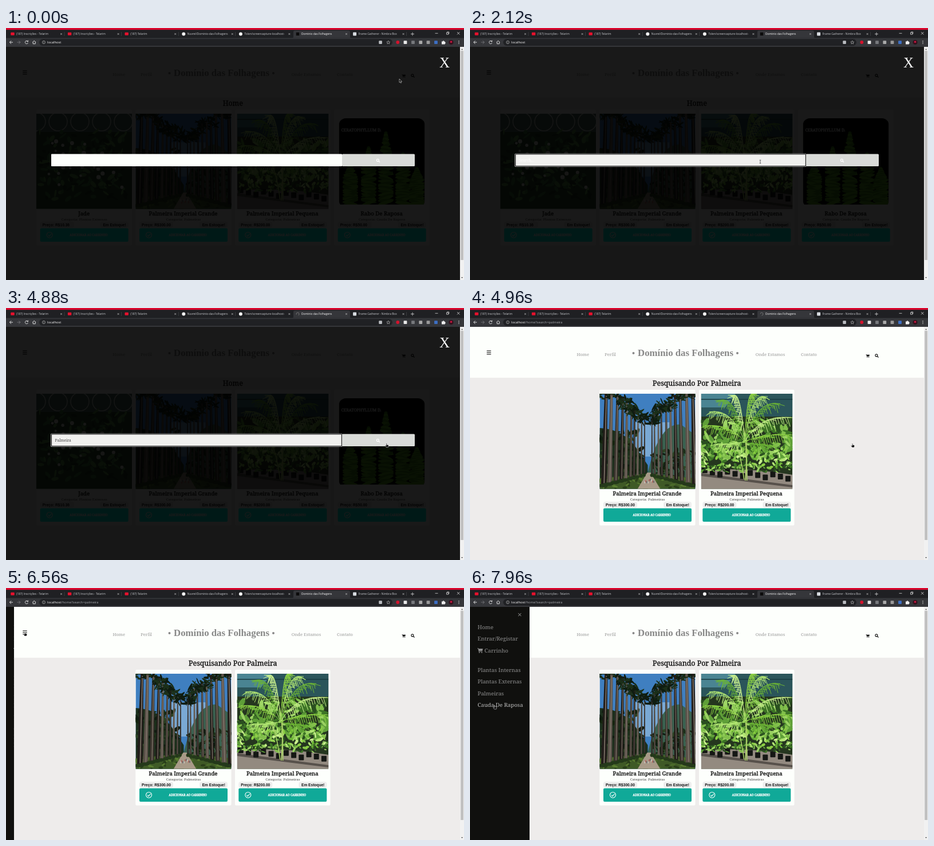
Write an HTML page that moves like this. It is 800 by 441 pixels and loops after 8 s.

```html
<!DOCTYPE html>
<html lang="pt">
<head>
<meta charset="utf-8">
<title>Domínio das Folhagens</title>
<style>
html, body { margin: 0; width: 100%; height: 100%; overflow: hidden; background: #eeeceb; }
svg { display: block; }
#stage, #pointer { position: absolute; left: 0; top: 0; width: 800px; height: 441px; }
text, #side { font-family: "Noto Serif", serif; }
.ui { font-family: "Open Sans", sans-serif; }
.sans { font-family: "Liberation Sans", sans-serif; font-weight: bold; }
.title { font-family: "Liberation Serif", serif; font-weight: bold; }
.thin { font-family: "Liberation Serif", serif; }
.b { stroke: currentColor; stroke-width: .35px; }
#side { position: absolute; left: 0; top: 33px; height: 382.3px; padding-top: 25.7px; width: 0;
  overflow: hidden; background: #10100e; font-size: 9.7px; line-height: 13.9px; }
#side a { display: block; padding: 3.3px 3.3px 3.3px 13.3px; color: #909090; }
#side a.on { color: #bdbdbd; }
#side a svg { display: inline-block; vertical-align: -1px; }
#side i { position: absolute; right: 13.5px; top: 7px; font: 13px/14px "Liberation Sans", sans-serif; color: #818181; }
</style>
</head>
<body>
<svg id="stage" viewBox="0 0 800 441"></svg>
<div id="side"></div>
<svg id="pointer" viewBox="0 0 800 441"></svg>
<script>
const $ = id => document.getElementById(id);
let seed = 11;
const rnd = (a = 0, b = 1) => a + (b - a) * (seed = seed * 16807 % 2147483647) / 2147483647;
const times = (n, f) => Array.from({ length: n }, (_, i) => f(i)).join('');

const rect = (x, y, w, h, fill, r = 0, more = '') =>
  `<rect x="${x}" y="${y}" width="${w}" height="${h}" fill="${fill}" rx="${r}" ${more}/>`;
const disc = (x, y, r, fill) => `<circle cx="${x}" cy="${y}" r="${r}" fill="${fill}"/>`;
const oval = (x, y, a, b, fill, rot = 0) =>
  `<ellipse rx="${a}" ry="${b}" fill="${fill}" transform="translate(${x} ${y}) rotate(${rot})"/>`;
const area = (d, fill) => `<path d="${d}" fill="${fill}"/>`;
const line = (d, color, w = 1) => `<path d="${d}" fill="none" stroke="${color}" stroke-width="${w}"/>`;
const text = (x, y, s, size, fill, cls = '', anchor = 'start') =>
  `<text x="${x}" y="${y}" font-size="${size}" fill="${fill}" color="${fill}" class="${cls}" text-anchor="${anchor}">${s}</text>`;
const mid = (x, y, s, size, fill, cls) => text(x, y, s, size, fill, cls, 'middle');
const lens = (x, y, color) =>
  `<g transform="translate(${x} ${y})"><circle cx="-.6" cy="-.6" r="2" fill="none" stroke="${color}" stroke-width="1.1"/>${line('M.9 .9L3 3', color, 1.3)}</g>`;
const cartShape = color =>
  area('M0 1h1.8l.4 1.2H10L9 6.2H3.2l.2.8H9v1H2.5L1.2 2H0z', color) + disc(3.5, 9.1, .9, color) + disc(8, 9.1, .9, color);
const cross = (x, y, r, color, w) =>
  line(`M${x - r} ${y - r}l${2 * r} ${2 * r}m0 ${-2 * r}l${-2 * r} ${2 * r}`, color, w);

// Pictures, each in its own clipped box
const frame = (x, y, w, h, body) => `<svg x="${x}" y="${y}" width="${w}" height="${h}">${body}</svg>`;
const leaves = (n, x0, x1, y0, y1, size, colors) => times(n, i =>
  oval(rnd(x0, x1), rnd(y0, y1), rnd(.5, 1.2) * size, rnd(.2, .5) * size, colors[i % colors.length], rnd(0, 180)));

function avenue() {
  const dark = ['#0f1c10', '#1b2f19', '#2c4423', '#15240f'];
  let s = rect(0, 0, 167, 167, '#3f7fc0') + rect(62, 50, 60, 60, '#7aa9d4') +
    area('M76 167L92 108Q112 50 142 54L167 72V167z', '#3a6250') +
    area('M0 167V60Q40 62 62 92L84 125V167z', '#1c2f1c') +
    leaves(70, 0, 72, 62, 140, 7, dark) + leaves(90, 92, 167, 98, 146, 6, dark) +
    area('M0 167V148L80 140H92L167 148V167z', '#3f5a26') +
    leaves(60, 0, 167, 146, 165, 5, ['#2a3f1a', '#587a30', '#4a6a2a']) +
    area('M83 138H89L106 167H66z', '#a89a88');
  for (let i = 9; i >= 0; i--) for (const side of [-1, 1]) {
    const d = 7 + i * 4.6 + i * i * .38 + rnd(-1, 1), x = 84 + side * d, w = 1.5 + d * .07;
    const top = Math.max(-4, 44 - d * .8 + rnd(-6, 6)), base = 141 + d * .25, lean = -side * d * .05;
    s += times(14, () => oval(x + rnd(-9, 9), top + rnd(-5, 12), rnd(3, 9), rnd(.7, 2), dark[i % 2], rnd(-75, 75)));
    s += area(`M${x + lean} ${top}h${w * .7}L${x + w} ${base}h${-w * 1.4}z`, ['#221d1a', '#3b342e', '#5a5149'][i % 3]);
    s += line(`M${x + lean + w * .4} ${top + 8}L${x + w * .4} ${base - 4}`, '#857a6e', w * .22);
    s += oval(x, base, w * 1.4, 3, '#24391a');
  }
  return s + times(9, i => rect(78 + i * 2, 148 + rnd(0, 6), 1, 3.5, ['#ddd', '#a33', '#345'][i % 3]));
}

function frond(x, y, dx, dy, color) {
  const cx = x + dx * .35, cy = y + dy * 1.15, side = Math.sign(dx);
  let d = `M${x} ${y}Q${cx} ${cy} ${x + dx} ${y + dy}`;
  for (let u = .2; u <= 1; u += .045) {
    const v = 1 - u, px = v * v * x + 2 * u * v * cx + u * u * (x + dx), py = v * v * y + 2 * u * v * cy + u * u * (y + dy);
    d += `M${px} ${py}l${side * rnd(3, 7)} ${rnd(12, 22) - u * 5}M${px} ${py}l${side * rnd(8, 13)} ${rnd(-7, 0) + u * 7}`;
  }
  return line(d, color, 1);
}

function nursery() {
  const greens = ['#3d7426', '#5f9f38', '#82bf4c', '#2a4f20', '#9ad162'];
  const bright = ['#8cd043', '#b2e673', '#6cb535', '#c9f08d'];
  return rect(0, 0, 160, 167, '#25361f') + rect(0, 0, 160, 40, '#2b555a') + area('M0 0H60L42 24H0z', '#4a8492') +
    rect(0, 9, 160, 1.5, '#183b40') + area('M0 134Q80 128 160 142V167H0z', '#938a80') +
    area('M0 139L160 160V164L0 144z', '#57514b') +
    leaves(170, 0, 160, 48, 115, 9, greens) + leaves(170, 0, 160, 95, 130, 5, greens.concat(bright)) +
    times(12, i => rect(2 + i * 13.2, 129 + i % 3 * 3 + i * .8, 9, 10, '#151714', 1)) +
    leaves(60, 0, 160, 124, 137, 4, greens) +
    line('M77 152Q82 100 74 60M80 152L79 75M75 150Q70 110 60 85', '#a9cf68', 1.6) +
    [[-70, -28], [-62, -52], [-44, -72], [-20, -80], [14, -82], [36, -78], [60, -66], [78, -42], [80, -12], [-52, 4], [48, 6]]
      .map(([x, y], i) => frond(76, 84, x, y, bright[i % 4])).join('');
}

const bush = () => rect(0, 0, 167, 167, '#2c4a2c') + rect(0, 0, 167, 32, '#4c6258') +
  times(5, i => `<circle cx="${i * 38}" cy="14" r="16" fill="none" stroke="#c8d2cd" stroke-width="1.6"/>`) +
  leaves(170, 5, 160, 30, 150, 7, ['#1a381c', '#3f7a3c', '#5c964c']) +
  times(26, () => disc(rnd(20, 150), rnd(40, 130), rnd(2, 4), '#dfe3d8'));

const plumes = () => rect(0, 0, 150, 151, '#000') +
  [[20, 80], [52, 52], [82, 26], [112, 62], [136, 88]].map(([x, top]) => times(34, i => {
    const y = top + i * (151 - top) / 34;
    return oval(x, y, 3 + Math.min(i, 12) * .9, 3, i % 2 ? '#5fae1e' : '#3f8a18', rnd(-25, 25));
  })).join('') + text(4, 23, 'CERATOPHYLLUM D.', 7, '#fff', 'b');

// Page
const buttonText = 'ADICIONAR AO CARRINHO';
function card(x, w, cx, photo, name, kind, price, teal) {
  return rect(x, 143, w, 237.5, '#fdfffc', 2) + photo +
    mid(cx - .5, 327.5, name, 9.65, '#111', 'b') + mid(cx, 337, 'Categoria: ' + kind, 6.15, '#444') +
    rect(cx - 77, 339, 59, 10.5, '#eee', 4) + text(cx - 73, 347, 'Preço: R$' + price, 6.6, '#111', 'sans') +
    rect(cx + 28, 339, 49, 10.5, '#eee', 4) + text(cx + 73, 347, 'Em Estoque!', 6.6, '#111', 'sans', 'end') +
    rect(cx - 77, 350.5, 154, 23.5, teal, 2) + mid(cx + 7.7, 364.4, buttonText, 5.15, '#fff', 'b') +
    `<g class="check"><circle cx="${cx - 60.5}" cy="362.2" r="5" fill="none" stroke="#fff" stroke-width="1.1"/>` +
    line(`M${cx - 63} 362.4l1.9 2 3.6-4`, '#fff', 1.1) + '</g>';
}
const palms = teal =>
  card(226.3, 167.2, 310, frame(226.5, 150, 167, 166.5, avenue()), 'Palmeira Imperial Grande', 'Palmeiras', '300.00', teal) +
  card(400, 166.5, 483.3, frame(403.7, 150, 159.5, 166.5, nursery()), 'Palmeira Imperial Pequena', 'Palmeiras', '200.00', teal);

const header = rect(0, 33, 793, 408, '#eeeceb') + rect(0, 33, 793, 89, '#fdfffc') +
  times(3, i => rect(29.3, 74.4 + i * 3, 7.4, 1.1, '#111')) +
  [['Home', 197.3], ['Perfil', 245], ['Onde Estamos', 524.5], ['Contato', 592]].map(([s, x]) => mid(x, 84, s, 7.6, '#999')).join('') +
  mid(376.5, 84, 'Domínio das Folhagens', 16.8, '#888', 'title') + disc(285.5, 79, 2, '#888') + disc(467, 79, 2, '#888') +
  `<g transform="translate(691.5 80.3) scale(.65)">${cartShape('#111')}</g>` + lens(710.5, 83.5, '#111');

const neon = '#00ffee';
const home = mid(396.3, 136, 'Home', 12.4, '#111', 'b') +
  card(53, 167, 136.7, frame(53, 150, 167, 166.5, bush()), 'Jade', 'Plantas Externas', '10.36', neon) + palms(neon) +
  card(573, 167, 656.7, `<g clip-path="inset(0 round 12px)">${frame(581.5, 158, 150, 151, plumes())}</g>`,
    'Rabo De Raposa', 'Cauda De Raposa', '50.00', neon) +
  rect(0, 33, 793, 408, '#000', 0, 'opacity=".9"');

const modal = mid(766, 68.5, 'X', 25, '#fff', 'thin') +
  `<g id="idle">${rect(79, 220.5, 508, 21.5, '#fdfffc', 1)}</g>` +
  `<g id="focus">${rect(78.2, 219.7, 509.3, 23.1, '#fff', 1.5) + rect(78.8, 220.3, 508.1, 21.9, '#111', 1) + rect(80, 221.4, 505.8, 19.7, '#f0f0ee')}</g>` +
  rect(587, 220.5, 127, 21.5, '#d9dbd8', 1.5) + lens(650, 232, '#fff') +
  text(85.5, 234, '', 6.6, '#444').replace('<text', '<text id="field"') +
  rect(85.5, 227, .7, 9, '#222', 0, 'id="caret"');

// Browser window
const tabs = ['(187) Inscrições - Telarim', '(187) Inscrições - Telarim', '(187) Telarim',
  'Nuvrel/Dominio-das-Folhagens', 'Tolen/screencapture-localhost-', 'Dominio das Folhagens', 'Frame Gatherer - Nimbra Box'];
const chrome = rect(0, 0, 800, 33, '#35363a') + rect(0, 0, 800, 17.5, '#1f2023') + rect(0, 0, 800, 3.2, '#d9082f') +
  area('M500 17.5Q502 17.5 502 15V7Q502 4.5 504.5 4.5H598.5Q601 4.5 601 7V15Q601 17.5 603 17.5z', '#35363a') +
  tabs.map((s, i) => {
    const x = 11.5 + i * 99.6;
    return text(x + 6.5, 12.2, s, 4.9, i == 5 ? '#fff' : '#c9cbcf', 'ui') + cross(x + 85, 10.5, 1.5, '#ddd', .6) +
      (i < 3 ? rect(x - 3.2, 7.8, 6.4, 5, '#e8112d', 1) : i < 5 ? disc(x, 10.4, 3, '#f2f2f2') : i == 6 ? rect(x - 3, 7.5, 6, 6, '#d9dde2', 1) : '') +
      (i == 4 || i == 5 ? '' : rect(x + 90.2, 7, .5, 7, '#55575b'));
  }).join('') +
  `<g id="icon">${rect(506.8, 7.7, 5.5, 5.5, '#0b0b0b')}</g><circle id="spin" cx="509.5" cy="10.5" r="2.4" fill="none" stroke="#777" stroke-width=".9" stroke-dasharray="10 5"/>` +
  line('M707 10.5h6m-3-3v6M749.5 9.3h5M788 7l4.5 4.5m0-4.5l-4.5 4.5M769.5 8h3.2v3.2h-3.2zM770.6 8V6.9h3.2v3.2h-1', '#eee', .7) +
  line('M12 25H6.5m2.6-2.7L6.4 25l2.7 2.7', '#eee', .9) + line('M19.5 25H25m-2.6-2.7l2.7 2.7-2.7 2.7', '#77787c', .9) +
  line('M38 23.4A2.6 2.6 0 1 0 38.4 26M38.5 21.8v2h-2', '#eee', .9) + line('M46.3 25l2.9-2.7 2.9 2.7M47.2 24.5v3.2h4v-3.2', '#eee', .9) +
  rect(58, 19.2, 617, 11.8, '#202124', 5.9) +
  `<circle cx="66" cy="25" r="2.6" fill="none" stroke="#ccc" stroke-width=".6"/>` + rect(65.7, 24.5, .6, 2, '#ccc') + rect(65.7, 23.4, .6, .6, '#ccc') +
  `<text x="72" y="27.2" font-size="5.8" fill="#fff" class="ui">localhost<tspan id="path" fill="#a4a7ab"></tspan></text>` +
  rect(651.3, 22.3, 5.6, 5.6, '#b9bcc0', 1) +
  line('M667.8 22.2l.9 2 2.1.2-1.6 1.4.5 2.1-1.9-1.1-1.9 1.1.5-2.1-1.6-1.4 2.1-.2z', '#ccc', .6) +
  disc(684.3, 25, 2.9, '#d5122c') +
  [[697.5, '#e8e8e8'], [711, '#77797d'], [724.3, '#aaa'], [737.5, '#999'], [751, '#3d6fc4']]
    .map(([x, c]) => rect(x - 2.9, 22.2, 5.8, 5.8, c, .8)).join('') +
  area('M761 23.4h2a1.1 1.1 0 0 1 2.2 0h1.6v1.6a1.1 1.1 0 0 1 0 2.2v1.3h-5.8z', '#eee') +
  disc(777.5, 25, 4, '#35101c') + disc(777.5, 24.2, 1.8, '#c5163f') + times(3, i => disc(791, 22.8 + i * 2.2, .7, '#ddd')) +
  rect(793, 33, 7, 408, '#f1f1f1') + rect(794.2, 40, 4.8, 366, '#c0c0c0') +
  area('M795 38.3l1.6-2 1.6 2z', '#555') + area('M795 436l1.6 2 1.6-2z', '#555');

$('stage').innerHTML = header + `<g id="home">${home + modal}</g>` +
  `<g id="found">${mid(396.3, 136, 'Pesquisando Por Palmeira', 12.4, '#111', 'b') + palms('#10a998')}</g>` + chrome;
$('side').innerHTML = '<i>×</i>' + ['Home', '<span style="white-space:nowrap">Entrar/Registar</span>',
  `<svg width="9.5" height="10" viewBox="0 0 10 10">${cartShape('#909090')}</svg> Carrinho`, '',
  'Plantas Internas', 'Plantas Externas', 'Palmeiras', 'Cauda De Raposa']
  .map(s => s ? `<a>${s}</a>` : '<div style="height:13.4px"></div>').join('');

const shape = d => `<path d="${d}" fill="#0a0a0a" stroke="#fff" stroke-width=".5"/>`;
$('pointer').innerHTML =
  `<g id="arrow">${shape('M0 0V6.4L1.5 5.1 2.5 7.3 3.5 6.8 2.6 4.7H4.6z')}</g>` +
  `<g id="hand">${shape('M-.6 .3Q0-.5.6.3V2.6L3 3.1Q3.7 3.3 3.6 4.2L3 7H-.6L-2.5 4.2Q-2.3 3.3-1.4 3.8L-.6 4.4z')}</g>` +
  `<g id="beam">${line('M-1.3-2.8H1.3M0-2.8V2.8M-1.3 2.8H1.3', '#333', .7)}</g>`;

// Motion
const track = [[0, 687, 89], [80, 687, 89], [880, 690, 108], [1560, 507, 234], [4360, 507, 234], [4720, 655, 236],
  [4960, 668, 237], [5240, 668, 237], [5600, 640, 228], [5760, 600, 220], [6000, 123, 135], [6360, 33, 77],
  [6600, 33, 77], [6800, 36, 80], [7400, 40, 130], [7960, 43, 205]];
const keys = [3240, 3480, 3640, 3760, 3840, 4000, 4040, 4080];
const swap = 4920, open = 6500;

function pointerAt(t) {
  const i = track.findIndex(k => k[0] > t);
  if (i < 0) return track[track.length - 1].slice(1);
  const [a, b] = [track[i - 1], track[i]], u = (t - a[0]) / (b[0] - a[0]), e = u * u * (3 - 2 * u);
  return [a[1] + (b[1] - a[1]) * e, a[2] + (b[2] - a[2]) * e];
}

// CSS "ease" curve
function ease(x) {
  if (x <= 0) return 0;
  if (x >= 1) return 1;
  let lo = 0, hi = 1, s;
  for (let i = 0; i < 20; i++) {
    s = (lo + hi) / 2;
    .75 * s * (1 - s) + s ** 3 < x ? lo = s : hi = s;
  }
  return .3 * s * (1 - s) ** 2 + 3 * s * s * (1 - s) + s ** 3;
}

const show = (id, on) => $(id).style.display = on ? '' : 'none';
const links = [...document.querySelectorAll('#side a')];
const checks = [...document.querySelectorAll('#found .check')];

function draw(t) {
  const before = t < swap, focused = t >= 1600, [x, y] = pointerAt(t);
  show('home', before);
  show('found', !before);
  show('idle', !focused);
  show('focus', focused);
  $('path').textContent = before ? '' : '/home?search=palmeira';
  checks.forEach(c => c.style.display = t >= 5000 ? '' : 'none');
  const loading = t >= 4800 && t < 5160;
  show('icon', !loading);
  show('spin', loading);
  $('spin').setAttribute('transform', `rotate(${t * .4} 509.5 10.5)`);

  const n = keys.filter(k => k <= t).length, field = $('field');
  field.textContent = n ? 'Palmeira'.slice(0, n) : focused ? 'Search...' : '';
  field.setAttribute('fill', n ? '#444' : '#fff');
  if (before) $('caret').setAttribute('x', 85.5 + (n ? field.getComputedTextLength() : 0));
  const since = t - (n ? keys[n - 1] : 1600);
  show('caret', focused && Math.floor(since / 520) % 2 == 0);

  $('side').style.width = 104 * ease((t - open) / 500) + 'px';
  let over = false;
  for (const a of links) {
    const r = a.getBoundingClientRect(), on = t > open + 150 && y >= r.top && y < r.bottom;
    a.classList.toggle('on', on);
    over = over || on;
  }
  const inBar = before && y > 220 && y < 242;
  const kind = inBar && x > 79 && x < 587 ? 'beam'
    : inBar && x < 714 || t >= swap && t < 5000 || over || t > 6200 && t < 6700 && x < 45 ? 'hand' : 'arrow';
  for (const k of ['arrow', 'hand', 'beam']) {
    show(k, k == kind);
    $(k).setAttribute('transform', `translate(${x} ${y})`);
  }
}

const start = performance.now();
function tick() {
  draw((performance.now() - start) % 8000);
  requestAnimationFrame(tick);
}
tick();
</script>
</body>
</html>
```
